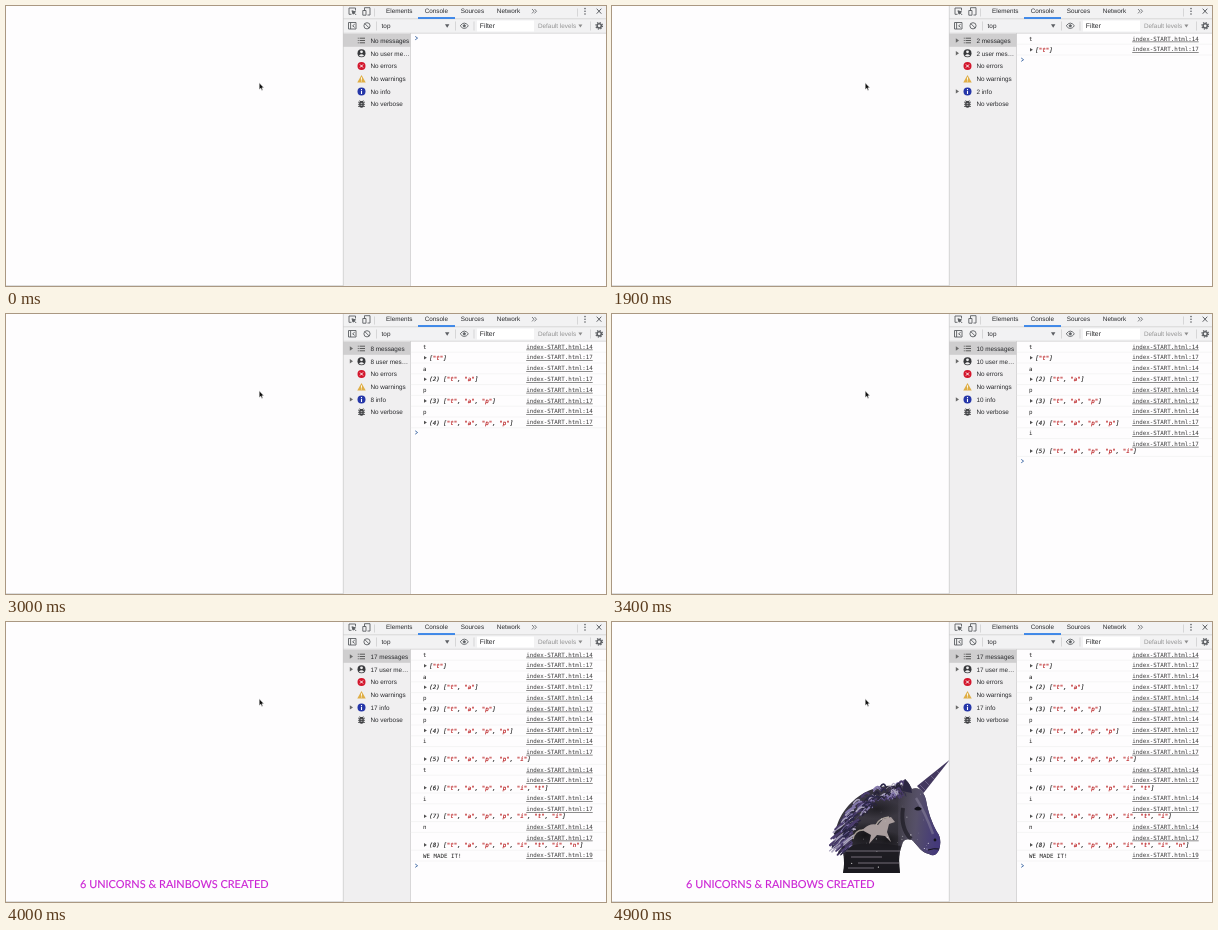
An HTML page for the animation above (5000 ms loop, 600 by 280 pixels).

```html
<!DOCTYPE html>
<html lang="en">
<head>
<meta charset="utf-8">
<title>Console key log</title>
<style>
  html, body { margin: 0; width: 100%; height: 100%; overflow: hidden; background: #fefdfe; }
  svg { display: block; width: 600px; height: 280px; }
  text { white-space: pre; text-rendering: geometricPrecision; }
  .ui { font: 6.35px "Liberation Sans", Arial, sans-serif; fill: #28292c; }
  .log { font: 5.82px "DejaVu Sans Mono", Menlo, monospace; fill: #222; }
  .link { text-decoration: underline; fill: #3c3c3c; }
  .arr { font-style: italic; stroke: #222; stroke-width: .16px; }
  .str { fill: #b81a1c; stroke: #b81a1c; }
  .title { font: 10.95px Lato, sans-serif; fill: #cb22d4; stroke: #cb22d4; stroke-width: .12px; }
  .line { fill: none; stroke: #5c5f63; stroke-width: .9px; }
  .rule { fill: none; stroke: #cbcbcb; stroke-width: .7px; }
  .off { display: none; }
  #unicorn { --mane: #433a70; --glow: #b7a58f; --lake: #c9c5cc; }
  #unicorn.soft { --mane: #4a3c6c; --glow: #a99d9d; --lake: #b5afb9; }
</style>
</head>
<body>
<svg viewBox="0 0 600 280">
  <defs>
    <linearGradient id="coat" x1="0" y1="0" x2="0" y2="1">
      <stop offset="0" stop-color="#35313f"/>
      <stop offset=".4" stop-color="#3b3841"/>
      <stop offset=".7" stop-color="#2c2a31"/>
      <stop offset="1" stop-color="#1b1a20"/>
    </linearGradient>
    <linearGradient id="face" x1="0" y1="0" x2="1" y2=".2">
      <stop offset="0" stop-color="#6a6578" stop-opacity="0"/>
      <stop offset=".5" stop-color="#565069"/>
      <stop offset="1" stop-color="#44397a"/>
    </linearGradient>
    <radialGradient id="cloud">
      <stop offset="0" stop-color="var(--lake)" stop-opacity=".8"/>
      <stop offset="1" stop-color="var(--lake)" stop-opacity="0"/>
    </radialGradient>
    <filter id="blur"><feGaussianBlur stdDeviation=".7"/></filter>
    <clipPath id="body">
      <path id="head" d="M231 251C233 242 232 232 229 224L223 214C224 197 236 180 252 171C264 164 280 162 288 165L293 157Q298 162 300 167C306 164 312 169 314 178C316 190 320 201 325 210C329 215 329 222 327 228Q323 236 317 232C310 231 306 224 300 218C294 216 291 218 290 223C286 232 287 242 288 251Z"/>
    </clipPath>
  </defs>

  <rect width="600" height="280" fill="#fefdfe"/>
  <path d="M0 279.5H337" stroke="#dedede"/>

  <g id="unicorn" class="off">
    <path d="M305 164L338 137.5L311.5 171Z" fill="#43385f"/>
    <path d="M308 163l5 5M313 159l4 4M319 154l3 3M325 149l2 2" stroke="#7d7099" stroke-width=".7"/>
    <use href="#head" fill="url(#coat)"/>
    <g clip-path="url(#body)">
      <rect x="286" y="160" width="44" height="76" fill="url(#face)"/>
      <ellipse cx="265" cy="187" rx="24" ry="10" fill="url(#cloud)" opacity=".55"/>
      <ellipse cx="253" cy="213" rx="20" ry="13" fill="url(#cloud)" opacity=".7"/>
      <ellipse cx="275" cy="218" rx="15" ry="9" fill="url(#cloud)" opacity=".6"/>
      <path d="M236 224Q262 218 292 225V252H228Z" fill="#1b191f" opacity=".7"/>
      <path d="M234 229H289M239 235H270M246 241H288M236 246H262" stroke="#85808b" stroke-width="1.3" opacity=".55" filter="url(#blur)"/>
      <g filter="url(#blur)">
        <path d="M250 208Q258 200 266 203L271 197L279 195L283 200L277 202L275 210L279 220L273 214L265 213L257 222L259 213Z" style="fill:var(--glow)"/>
        <path d="M264 203Q267 196 277 195M251 208Q243 208 241 217" fill="none" stroke="#d9cdbf" stroke-width="1.4" opacity=".7"/>
      </g>
      <path d="M299 217Q288 206 291 186" fill="none" stroke="#191720" stroke-width="4" opacity=".65"/>
      <path d="M304 176Q313 190 321 212" fill="none" stroke="#8d87a0" stroke-width="2.5" opacity=".5" filter="url(#blur)"/>
      <path d="M316 228Q322 226 327 227" fill="none" stroke="#14121a"/>
      <circle cx="323" cy="218" r="1.4" fill="#16141d"/>
      <path d="M302 187Q306 182 310 187Q306 190 302 187Z" fill="#111018"/>
      <g id="stars" fill="#fff"></g>
    </g>
    <g id="mane" fill="none" stroke-linecap="round"></g>
    <path d="M293 157Q299 162 300 171L290 169Z" fill="#2b2741"/>
  </g>
  <text id="title" class="title off" x="74" y="266">6 UNICORNS &amp; RAINBOWS CREATED</text>

  <rect x="337" width="263" height="280" fill="#fefdfe"/>
  <rect x="337" y="27" width="67.5" height="253" fill="#f0eff0"/>
  <rect x="337" width="263" height="27" fill="#f2f2f3"/>
  <rect x="337" y="28" width="67.5" height="12.8" fill="#cfcecf"/>
  <path class="rule" d="M337.3 0V280M404.5 27V280M337 12.8H600M337 27.2H600M368.5 2.5V10.5M571.5 2.5V10.5M370.5 15.5V24.5M449.5 15.5V24.5M468 15.5V24.5M584.5 15.5V24.5"/>
  <rect x="412" y="11.2" width="37" height="1.6" fill="#1a73e8"/>
  <rect x="471" y="14.5" width="57" height="11" fill="#fff"/>

  <g class="line">
    <path d="M345.5 8.3H343V2H349.5V4.5M346 4.8L350.2 9"/>
    <path d="M346 4.8L349.5 5.8L347 8.2Z" fill="#5c5f63"/>
    <path d="M358.5 5V1.7H364V9H361.5M356.8 4.5H360V9.2H356.8Z"/>
    <path d="M342.5 16.5H350V23H342.5ZM344.6 16.5V23M348.7 18.2L346.6 19.8L348.7 21.4"/>
    <circle cx="361" cy="19.8" r="3.1"/><path d="M358.8 17.6L363.2 22"/>
    <path d="M454.2 19.8Q458.3 14.4 462.4 19.8Q458.3 25.2 454.2 19.8Z"/>
    <circle cx="458.3" cy="19.8" r="1.1" fill="#5c5f63"/>
    <path d="M590.7 2.7L595.3 7.7M595.3 2.7L590.7 7.7" stroke-width="1"/>
    <circle cx="593.2" cy="19.8" r="2.1" stroke-width="1.5"/>
    <circle cx="593.2" cy="19.8" r="3.3" stroke-width="1.2" stroke-dasharray="1.3 1.29"/>
    <path d="M526 3L528 5.2L526 7.4M528.5 3L530.5 5.2L528.5 7.4" stroke-width=".8"/>
  </g>
  <path d="M439 18.3H443.4L441.2 21.8Z" fill="#5c5f63"/>
  <path d="M572.4 18.4H576.4L574.4 21.6Z" fill="#8c8c8c"/>
  <g fill="#5c5f63"><circle cx="579" cy="2.6" r=".8"/><circle cx="579" cy="5.3" r=".8"/><circle cx="579" cy="8" r=".8"/></g>
  <g class="ui">
    <text x="380" y="7.2">Elements</text>
    <text x="418.7" y="7.2">Console</text>
    <text x="454.8" y="7.2">Sources</text>
    <text x="490.8" y="7.2">Network</text>
    <text x="375.6" y="22">top</text>
    <text x="473.8" y="22" style="font-size:6.8px">Filter</text>
    <text x="532" y="22" style="fill:#949494">Default levels</text>
  </g>

  <g id="side" class="ui"></g>
  <g id="icons">
    <path d="M353.6 32.2H359M353.6 34.5H359M353.6 36.8H359M351.8 32.2H352.7M351.8 34.5H352.7M351.8 36.8H352.7" stroke="#5a5a5a"/>
    <circle cx="355.5" cy="47.2" r="4" fill="#38393c"/>
    <circle cx="355.5" cy="45.8" r="1.4" fill="#f0eff0"/>
    <path d="M352.9 49.6Q355.5 47 358.1 49.6Q355.5 51.6 352.9 49.6Z" fill="#f0eff0"/>
    <circle cx="355.5" cy="60" r="4" fill="#d3162c"/>
    <path d="M354 58.5L357 61.5M357 58.5L354 61.5" stroke="#fff"/>
    <path d="M355.5 68.9L359.7 76.4H351.3Z" fill="#dfae45"/>
    <path d="M355.5 71.3V73.8M355.5 74.5V75.4" stroke="#fff" stroke-width=".9"/>
    <circle cx="355.5" cy="85.5" r="4" fill="#2536a8"/>
    <path d="M355.5 83.1V84.2M355.5 85V88" stroke="#fff" stroke-width="1.1"/>
    <path d="M352 96.2H359M352 98.3H359M352 100.4H359M353.6 94.4L355 96M357.4 94.4L356 96" stroke="#3d3e41" stroke-width=".8"/>
    <rect x="353.3" y="95" width="4.4" height="6.8" rx="2.2" fill="#3d3e41"/>
    <path d="M354.6 97.4H356.4M354.6 99.3H356.4" stroke="#f0eff0" stroke-width=".7"/>
  </g>
  <g id="logs" class="log"></g>
  <path id="prompt" d="M409.2 -2.2L411.6 -.5L409.2 1.2" fill="none" stroke="#3d68a4" stroke-width=".9"/>
  <path d="M253.2 76.8V83.6L254.8 82.2L255.8 84.5L256.9 84L255.9 81.8H258Z" fill="#111" stroke="#fff" stroke-width=".5"/>
</svg>
<script>
const LOOP = 5000, WORD = "tappitin";
const KEYS = [1900, 2100, 2200, 2500, 3300, 3500, 3800, 4000];
const UNICORN_AT = 4100, SOFT_AT = 4200;
const TOP = 27.4, ROW = 10.8, TALL = 17.8;

const $ = id => document.getElementById(id);
function add(parent, tag, attrs, text = "") {
  const el = document.createElementNS("http://www.w3.org/2000/svg", tag);
  for (const k in attrs) el.setAttribute(k, attrs[k]);
  el.textContent = text;
  return parent.appendChild(el);
}
const show = (el, on) => el.classList.toggle("off", !on);

// Console rows: one for each key, one for the array so far, then the final message.
const rows = [], ends = [TOP];
function addRow(line, height = ROW) {
  const y = ends[ends.length - 1], g = add($("logs"), "g", {});
  add(g, "text", { class: "link", x: 520.2, y: y + 7.2 }, "index-START.html:" + line);
  add(g, "path", { d: `M404.8 ${y + height}H600`, stroke: "#efeeef", "stroke-width": .6 });
  rows.push(g);
  ends.push(y + height);
  return [g, y + height - 3.2];
}
function addText(line, text) {
  const [g, y] = addRow(line);
  add(g, "text", { x: 417, y }, text);
}
function addArray(n) {
  const [g, y] = addRow(17, n > 4 ? TALL : ROW);
  add(g, "path", { d: `M418 ${y - 3.9}L420.9 ${y - 2.1}L418 ${y - .3}Z`, fill: "#505050" });
  const t = add(g, "text", { class: "arr", x: 423.2, y });
  const span = (s, cls = "") => add(t, "tspan", { class: cls }, s);
  span((n > 1 ? `(${n}) ` : "") + "[");
  [...WORD.slice(0, n)].forEach((c, i) => {
    if (i) span(", ");
    span(`"${c}"`, "str");
  });
  span("]");
}
[...WORD].forEach((c, i) => { addText(14, c); addArray(i + 1); });
addText(19, "WE MADE IT!");

// Sidebar labels, with expanders on the rows that count messages.
const sideY = i => 34.5 + i * 12.73;
const labels = [..."012345"].map((_, i) => add($("side"), "text", { x: 364.4, y: sideY(i) + 2.3 }));
const arrows = [0, 1, 4].map(i =>
  add($("side"), "path", { d: `M343.8 ${sideY(i) - 2.2}L347 ${sideY(i)}L343.8 ${sideY(i) + 2.2}Z`, fill: "#6a6a6a" }));

function setCount(count) {
  const n = count || "No";
  const user = count && count < 10 ? "user mes…" : "user me…";
  const names = [n + " messages", `${n} ${user}`, "No errors", "No warnings", n + " info", "No verbose"];
  labels.forEach((el, i) => el.textContent = names[i]);
  arrows.forEach(el => show(el, count));
  rows.forEach((el, i) => show(el, i < count));
  $("prompt").setAttribute("transform", `translate(0 ${ends[count] + 5.2})`);
}

// Mane strands fan out along the crest; stars are scattered over the coat.
let seed = 7;
const rnd = () => (seed = seed * 16807 % 2147483647) / 2147483647;
const TONES = ["var(--mane)", "#2b2748", "var(--mane)", "#8378ab", "#28243a", "#aaa4bd"];
for (let i = 0; i < 200; i++) {
  const a = rnd() * 1.6, s = Math.sin(a), c = Math.cos(a), r = rnd() * 15 - 10;
  const x = 291 - (64 + r) * s, y = 224 - (59 + r) * c;
  const len = 5 + rnd() * 6, dx = -len * (.5 + .4 * s), dy = len * (s - .25);
  add($("mane"), "path", {
    d: `M${x + 3} ${y + 1}q${dx * .4} ${dy - 5} ${dx} ${dy}`,
    style: `stroke:${TONES[i % 6]};stroke-width:${.7 + rnd() * 1.5}`
  });
}
for (let i = 0; i < 45; i++)
  add($("stars"), "circle", { cx: 228 + rnd() * 92, cy: 168 + rnd() * 80, r: .25 + rnd() * .45, opacity: .35 + rnd() * .6 });

let last = -1;
function draw(t) {
  const n = KEYS.filter(k => k <= t).length, done = n === WORD.length;
  const count = 2 * n + done;
  if (count !== last) setCount(last = count);
  show($("title"), done);
  show($("unicorn"), t >= UNICORN_AT);
  $("unicorn").classList.toggle("soft", t >= SOFT_AT);
}

const start = performance.now();
function tick() {
  draw((performance.now() - start) % LOOP);
  requestAnimationFrame(tick);
}
tick();
</script>
</body>
</html>
```
